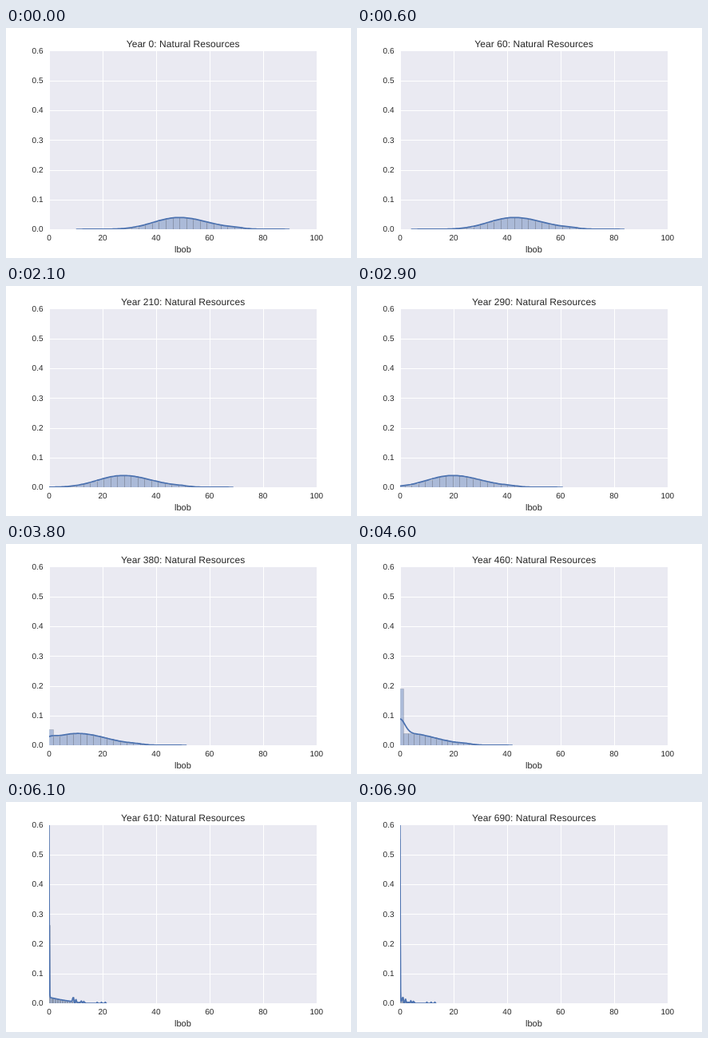
An HTML page that plays this animation: 432 by 288 pixels, repeating every 7 s.

```html
<!DOCTYPE html>
<html lang="en">
<head>
<meta charset="utf-8">
<title>Natural Resources</title>
<style>
html, body { margin: 0; width: 100%; height: 100%; overflow: hidden; background: #fff; }
svg { display: block; width: 432px; height: 288px; }
text { font-family: "Liberation Sans", Arial, sans-serif; font-size: 10px; fill: #262626; text-anchor: middle; text-rendering: geometricPrecision; }
#title { font-size: 12px; letter-spacing: .06px; }
</style>
</head>
<body>
<svg viewBox="0 0 432 288">
  <defs><clipPath id="plot"><rect x="54" y="29" width="335" height="223"/></clipPath></defs>
  <rect width="432" height="288" fill="#fff"/>
  <rect x="54" y="29" width="335" height="223" fill="#eaeaf2"/>
  <g clip-path="url(#plot)">
    <path id="grid" stroke="#fff" stroke-width="1" fill="none"/>
    <g id="bars" fill="#4c72b0" fill-opacity=".4" stroke="#000" stroke-width=".3" stroke-opacity=".4"></g>
    <path id="curve" fill="none" stroke="#4c72b0" stroke-width="1.75" stroke-linecap="round" stroke-linejoin="round"/>
  </g>
  <g id="ticks"></g>
  <text id="title" x="221.6" y="24"></text>
  <text x="221.4" y="281" style="font-size:11px">lbob</text>
</svg>
<script>
const $ = id => document.getElementById(id);
const NS = "http://www.w3.org/2000/svg";
const STEP = 100, STEPS = 70;

const px = v => 54 + v * 3.348;
const py = v => 252 - v * 372;
const snap = v => Math.floor(v + 0.5) + 0.5;

function add(parent, tag, attrs, text) {
  const el = document.createElementNS(NS, tag);
  for (const k in attrs) el.setAttribute(k, attrs[k]);
  if (text !== undefined) el.textContent = text;
  parent.appendChild(el);
}

function drawAxes() {
  let d = "";
  for (let v = 0; v <= 100; v += 20) {
    d += `M${snap(px(v))} 29V252`;
    add($("ticks"), "text", { x: px(v), y: 266 }, v);
  }
  for (let i = 0; i <= 6; i++) {
    const y = py(i / 10);
    if (i < 6) d += `M54 ${snap(y)}H389`;
    add($("ticks"), "text", { x: 46.5, y: Math.round(y + 3.3), style: "text-anchor:end" }, (i / 10).toFixed(1));
  }
  $("grid").setAttribute("d", d);
}

// Approximate inverse of the normal distribution function
function probit(p) {
  const u = 2 * p - 1, l = Math.log(1 - u * u), a = 0.147;
  const b = 2 / (Math.PI * a) + l / 2;
  return Math.sign(u) * Math.sqrt(2 * (Math.sqrt(b * b - l / a) - b));
}

// Starting stock: a slightly skewed bell with a sparse upper tail
function makeStock() {
  const tail = [0.7, 0.8, 0.9, 1, 1, 1.1, 1.2, 1.3, 1.8, 1.9, 2, 2.05, 2.1, 2.2, 2.5,
    3.1, 3.6, 3.9, 4, 4.1, 4.4, 4.9, 5, 5.3, 10, 11.6, 13];
  const stock = [18];
  for (let i = 0; i < 972; i++) {
    const z = probit((i + 0.5) / 1000);
    stock.push(50.25 + 9.8 * z + 0.5 * (z * z - 1));
  }
  return stock.concat(tail.map(t => 69 + t));
}
const stock = makeStock();

// One unit is used per step until the stock is no longer positive
const stockAt = n => stock.map(x => x > n ? x - n : x - Math.ceil(x)).sort((a, b) => a - b);

function quantile(s, q) {
  const k = q * (s.length - 1), i = Math.floor(k);
  return s[i] + (s[i + 1] - s[i]) * (k - i);
}

function histogram(s, iqr) {
  const n = s.length, lo = s[0], span = s[n - 1] - lo;
  const count = Math.min(50, Math.ceil(span / (2 * iqr / Math.cbrt(n))));
  const w = span / count, bins = new Array(count).fill(0);
  for (const v of s) bins[Math.min(count - 1, Math.floor((v - lo) / w))]++;
  return bins.map((c, i) => ({ a: lo + i * w, b: lo + (i + 1) * w, h: c / (n * w) }));
}

function density(s, iqr) {
  const n = s.length, mean = s.reduce((a, b) => a + b) / n;
  const sd = Math.sqrt(s.reduce((a, v) => a + (v - mean) ** 2, 0) / (n - 1));
  const bw = 1.059 * Math.min(sd, iqr / 1.349) * Math.pow(n, -0.2);
  const lo = s[0] - 3 * bw, hi = s[n - 1] + 3 * bw, pts = [];
  for (let i = 0; i < 128; i++) {
    const x = lo + (hi - lo) * i / 127;
    let sum = 0;
    for (const v of s) {
      const z = (x - v) / bw;
      if (z > -6 && z < 6) sum += Math.exp(-z * z / 2);
    }
    pts.push([x, sum / (n * bw * Math.sqrt(2 * Math.PI))]);
  }
  return pts;
}

function draw(n) {
  const s = stockAt(n), iqr = quantile(s, 0.75) - quantile(s, 0.25);
  $("bars").textContent = "";
  for (const { a, b, h } of histogram(s, iqr))
    add($("bars"), "path", { d: `M${snap(px(a))} 252.5V${snap(py(h))}H${snap(px(b))}V252.5Z` });
  $("curve").setAttribute("d", "M" + density(s, iqr)
    .map(([x, y]) => px(x).toFixed(2) + " " + py(y).toFixed(2)).join("L"));
  $("title").textContent = `Year ${n * 10}: Natural Resources`;
}

let shown = -1;
function tick(now) {
  const n = Math.floor(now / STEP) % STEPS;
  if (n !== shown) draw(shown = n);
  requestAnimationFrame(t => tick(Math.max(0, t - start)));
}

drawAxes();
const start = performance.now();
tick(0);
</script>
</body>
</html>
```
